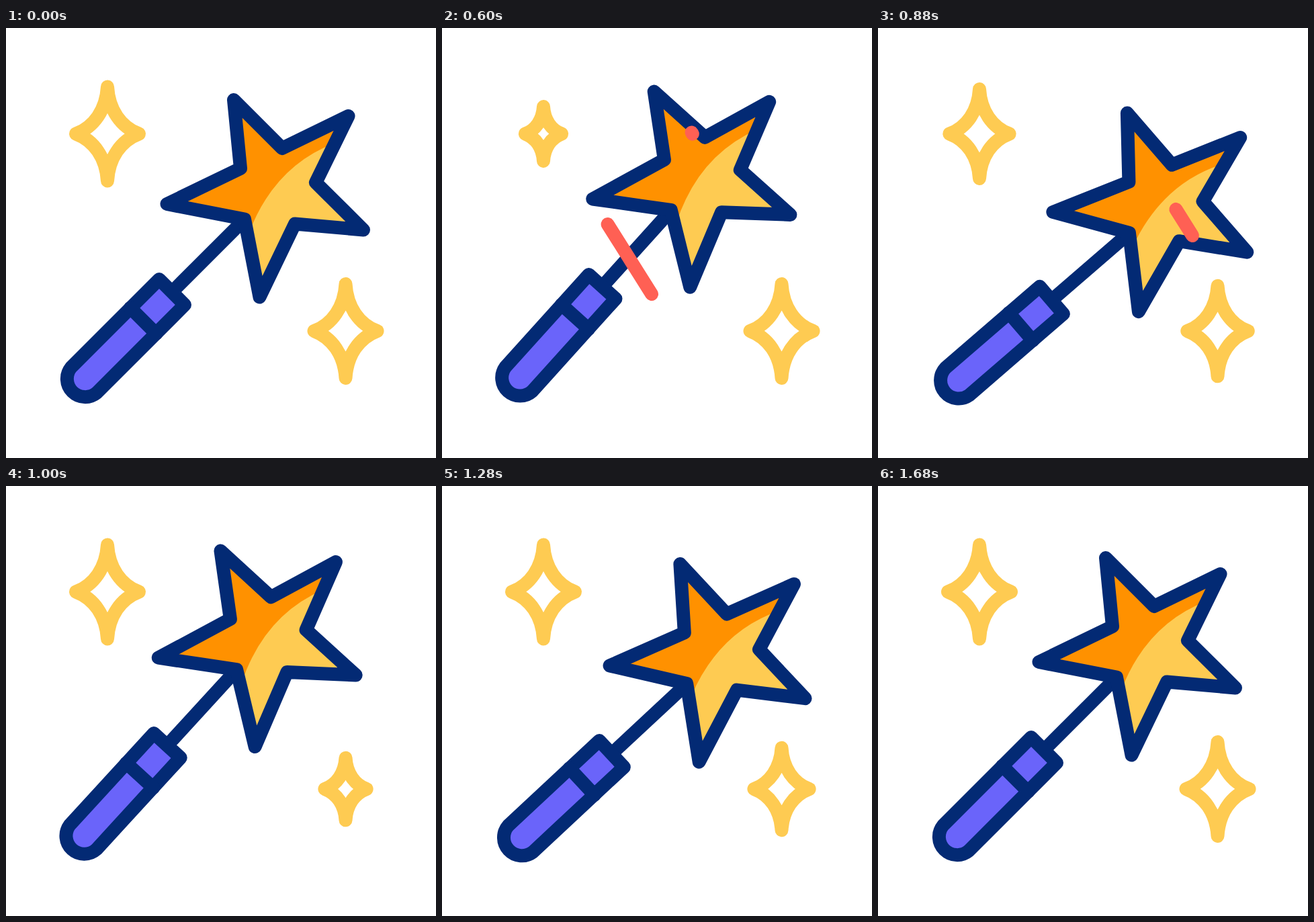
An HTML page that plays this animation: 640 by 640 pixels, repeating every 2000 ms.

```html
<!DOCTYPE html>
<html lang="en">
<head>
<meta charset="utf-8">
<title>Magic wand</title>
<style>
  html, body { margin: 0; height: 100%; overflow: hidden; background: #fff; }
  svg { display: block; width: 100vw; height: 100vh; }
</style>
</head>
<body>
<svg viewBox="0 0 640 640" fill="none" stroke-width="20" stroke-linecap="round" stroke-linejoin="round">
  <defs>
    <path id="spark" d="M0-70C2-36 20-10 47 0C20 10 2 36 0 70C-2 36-20 10-47 0C-20-10-2-36 0-70Z"/>
  </defs>
  <g stroke="#fecb52">
    <use class="spark" href="#spark"/>
    <use class="spark" href="#spark"/>
  </g>
  <g id="wand" stroke="#032a74">
    <path d="M250 390L350 290"/>
    <path fill="#6a64fa" d="M228 374L266 412L135 543A27 27 0 0 1 97 505Z"/>
    <path d="M185 416.5L223.500 455"/>
    <path id="fill" stroke="none" fill="#ff9100"/>
    <path stroke="none" fill="#fecb52" d="M490 171Q400 205 362 304L377.500 400.500L430 291.500L532 300.500L461 230Z"/>
    <path id="outline"/>
  </g>
  <g stroke="#ff6054">
    <path class="streak"/>
    <path class="streak"/>
  </g>
</svg>
<script>
const LOOP = 2000, STEP = 40;
const PIVOT = '86 554';
const STAR = 'M339 107L411 179L509.5 131L461 230L532 300.5L430 291.5L377.5 400.5L355 284.5L239.5 262L349 209Z';

// Damped swing: [time, degrees]
const SWING = [[200, 0], [500, -8], [767, 8], [1067, -4], [1355, 3.2], [1588, -2.9], [1675, 0]];

const SPARKS = [
  { x: 151, y: 157.5, start: 400 },
  { x: 505.5, y: 451, start: 835 }
];
const SPARK_HALF = 266;

const STREAKS = [
  { from: [239, 280], to: [312, 396], start: 400 },
  { from: [371.5, 155.5], to: [468, 309], start: 586 }
];
const STREAK_TIME = 200, TAIL_DELAY = 160;

const wand = document.getElementById('wand');
const sparks = document.querySelectorAll('.spark');
const streaks = document.querySelectorAll('.streak');
for (const id of ['fill', 'outline']) document.getElementById(id).setAttribute('d', STAR);

const clamp = x => Math.min(1, Math.max(0, x));
const ease = x => x * x * (3 - 2 * x);
const easeFromLinear = x => ease(x) + x * (1 - x) ** 2;
const mix = (a, b, k) => a + (b - a) * k;

function swingAngle(t) {
  for (let i = 1; i < SWING.length; i++) {
    const [t0, a0] = SWING[i - 1], [t1, a1] = SWING[i];
    if (t < t1) {
      const curve = i === 1 ? easeFromLinear : ease;
      return mix(a0, a1, curve(clamp((t - t0) / (t1 - t0))));
    }
  }
  return 0;
}

function drawSpark(el, { x, y, start }, t) {
  const phase = 1 - Math.abs((t - start) / SPARK_HALF - 1);
  const scale = 1 - 0.5 * ease(clamp(phase));
  el.setAttribute('transform', `translate(${x} ${y}) scale(${scale})`);
  el.setAttribute('stroke-width', 20 / scale);
}

function drawStreak(el, { from, to, start }, t) {
  const head = ease(clamp((t - start) / STREAK_TIME));
  const tail = ease(clamp((t - start - TAIL_DELAY) / STREAK_TIME));
  const point = k => from.map((v, i) => mix(v, to[i], k));
  el.setAttribute('d', head > tail ? `M${point(tail)}L${point(head)}` : '');
}

function draw(now) {
  const t = Math.floor((now % LOOP) / STEP) * STEP;
  wand.setAttribute('transform', `rotate(${swingAngle(t)} ${PIVOT})`);
  SPARKS.forEach((s, i) => drawSpark(sparks[i], s, t));
  STREAKS.forEach((s, i) => drawStreak(streaks[i], s, t));
}

let origin;
function tick(now) {
  origin ??= now;
  draw(now - origin);
  requestAnimationFrame(tick);
}
draw(0);
requestAnimationFrame(tick);
</script>
</body>
</html>
```
